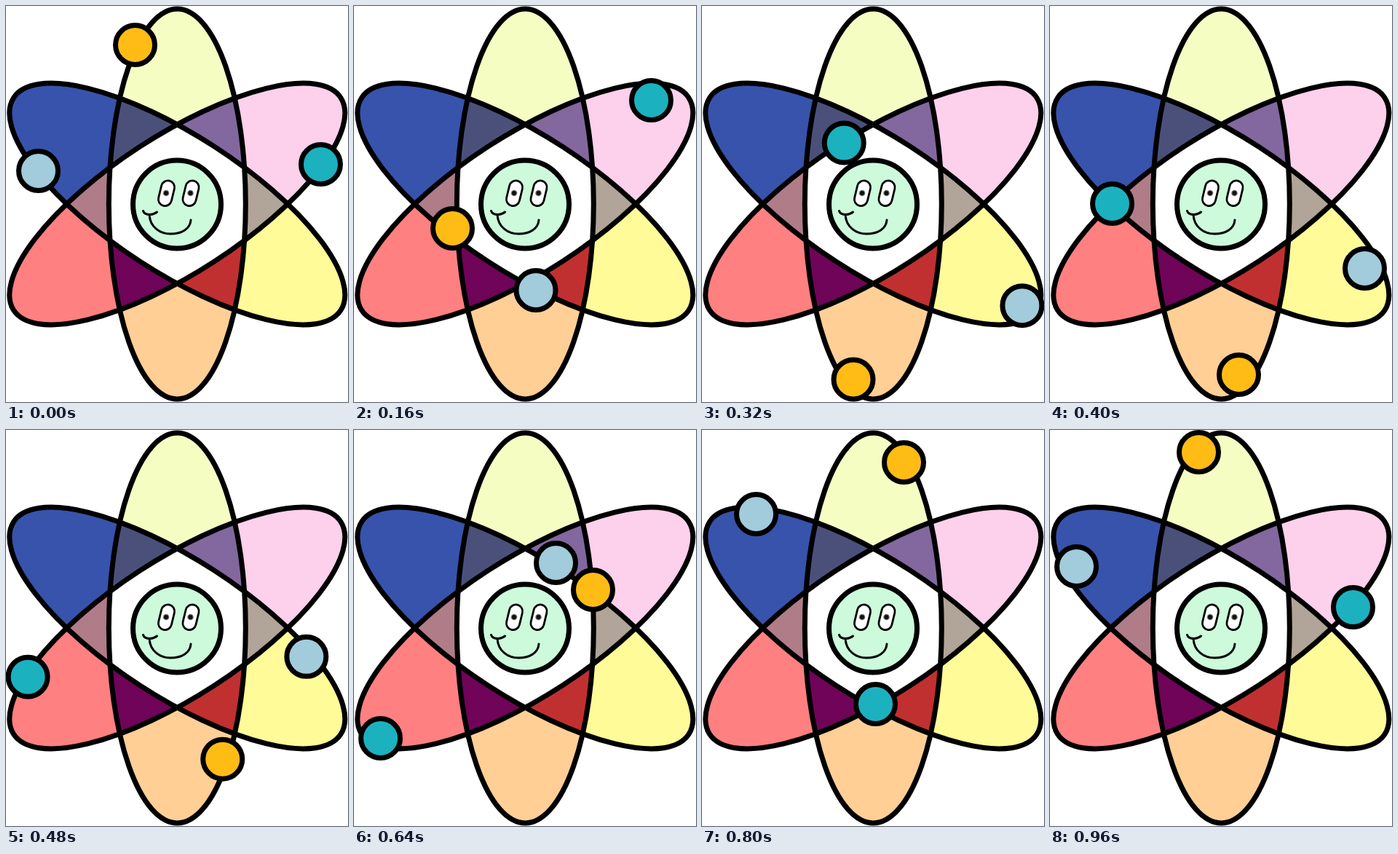
Animation of 470 by 544 pixels, one loop 1040 ms. Source, as an HTML page with a canvas:

```html
<!DOCTYPE html>
<html lang="en">
<head>
<meta charset="utf-8">
<title>Smiling atom</title>
<style>
html, body { margin: 0; width: 100%; height: 100%; overflow: hidden; background: #fff; }
canvas { display: block; }
</style>
</head>
<body>
<canvas id="stage" width="470" height="544"></canvas>
<script>
const ctx = document.getElementById('stage').getContext('2d');
const CX = 235.3, CY = 272, LONG = 268, SHORT = 94, TILT = 33 * Math.PI / 180;
const STEP = 80, STEPS = 13;

function orbit(tilt) {
  const path = new Path2D();
  path.ellipse(CX, CY, LONG, SHORT, tilt, 0, 2 * Math.PI);
  return path;
}
const upright = orbit(Math.PI / 2), falling = orbit(TILT), rising = orbit(-TILT);

function rect(x, y, w, h) {
  const path = new Path2D();
  path.rect(x, y, w, h);
  return path;
}
const left = rect(0, 0, CX, 544), right = rect(CX, 0, 470, 544);
const top_ = rect(0, 0, 470, CY), bottom = rect(0, CY, 470, 544);

// Fills the area shared by all given paths.
function fillShared(color, ...paths) {
  ctx.save();
  paths.forEach(p => ctx.clip(p));
  ctx.fillStyle = color;
  ctx.fillRect(0, 0, 470, 544);
  ctx.restore();
}

function line(d, width, color = '#000') {
  ctx.lineWidth = width;
  ctx.strokeStyle = color;
  ctx.stroke(new Path2D(d));
}

function disc(x, y, r, color, width = 7) {
  ctx.beginPath();
  ctx.arc(x, y, r, 0, 2 * Math.PI);
  ctx.fillStyle = color;
  ctx.fill();
  ctx.lineWidth = width;
  ctx.strokeStyle = '#000';
  if (width) ctx.stroke();
}

function drawEye(x) {
  const d = `M${x + 2} 249L${x - 2} 265.5`;
  line(d, 21);
  line(d, 15.5, '#fff');
  disc(x - 0.5, 257, 4.3, '#777', 0);
  disc(x - 0.5, 257, 3, '#111', 0);
}

function drawAtom() {
  ctx.fillStyle = '#fff';
  ctx.fillRect(0, 0, 470, 544);

  fillShared('#f5fdc3', upright, top_);
  fillShared('#ffcf95', upright, bottom);
  fillShared('#3853ac', falling, left);
  fillShared('#fffb98', falling, right);
  fillShared('#ff8080', rising, left);
  fillShared('#fdd0eb', rising, right);

  fillShared('#4b507b', upright, falling, left);
  fillShared('#c13031', upright, falling, right);
  fillShared('#6f0458', upright, rising, left);
  fillShared('#82689e', upright, rising, right);
  fillShared('#af7c88', falling, rising, left);
  fillShared('#b1a498', falling, rising, right);
  fillShared('#fff', upright, falling, rising);

  ctx.lineCap = 'round';
  [upright, falling, rising].forEach(p => line(p, 7));

  disc(235, 272.5, 60.5, '#ccfadb');
  drawEye(220.5);
  drawEye(254);
  line('M188.5 281.5Q190 286.5 198 286.5Q204 286 207.5 283', 3);
  line('M197 287C198 304 212 313 226 313C242 313 253 306 254 294', 3);
}

// Turns [step, x, y] stops into phase and relative distance on a tilted orbit.
function electron(color, tilt, stops) {
  const c = Math.cos(tilt), s = Math.sin(tilt);
  let last = Infinity;
  const keys = stops.map(([step, x, y]) => {
    const dx = x - CX, dy = y - CY;
    const u = (dx * c + dy * s) / LONG, v = (dy * c - dx * s) / SHORT;
    let phase = Math.atan2(v, u);
    while (phase > last) phase -= 2 * Math.PI;
    last = phase;
    return { step, phase, r: Math.hypot(u, v) };
  });
  return step => {
    const i = Math.max(1, keys.findIndex(k => k.step >= step));
    const a = keys[i - 1], b = keys[i];
    const f = (step - a.step) / (b.step - a.step);
    const phase = a.phase + (b.phase - a.phase) * f;
    const r = a.r + (b.r - a.r) * f;
    const u = r * LONG * Math.cos(phase), v = r * SHORT * Math.sin(phase);
    disc(CX + u * c - v * s, CY + u * s + v * c, 27, color);
  };
}

const electrons = [
  electron('#a2cbdb', TILT, [
    [0, 44.5, 226.5], [2, 250, 390.5], [3, 397.5, 434.5], [5, 432.5, 360.5],
    [8, 277.5, 182.5], [10, 74.5, 115.5], [12, 36.5, 187.5]]),
  electron('#1cb1bf', -TILT, [
    [0, 432.5, 217.5], [2, 408.5, 129.5], [3, 314.5, 129.5], [5, 85.5, 271.5],
    [8, 36.5, 423.5], [10, 238.5, 376.5], [12, 416.5, 243.5]]),
  electron('#ffbc15', Math.PI / 2, [
    [0, 177.5, 53.5], [2, 135.5, 305.5], [3, 163.5, 444.5], [4, 208, 513],
    [5, 259.5, 506.5], [8, 328.5, 219.5], [10, 277.5, 44.5], [12, 204.5, 30.5]])
];

function frame(now) {
  const step = Math.floor(now / STEP) % STEPS;
  drawAtom();
  electrons.forEach(draw => draw(step));
  requestAnimationFrame(frame);
}
requestAnimationFrame(frame);
</script>
</body>
</html>
```
